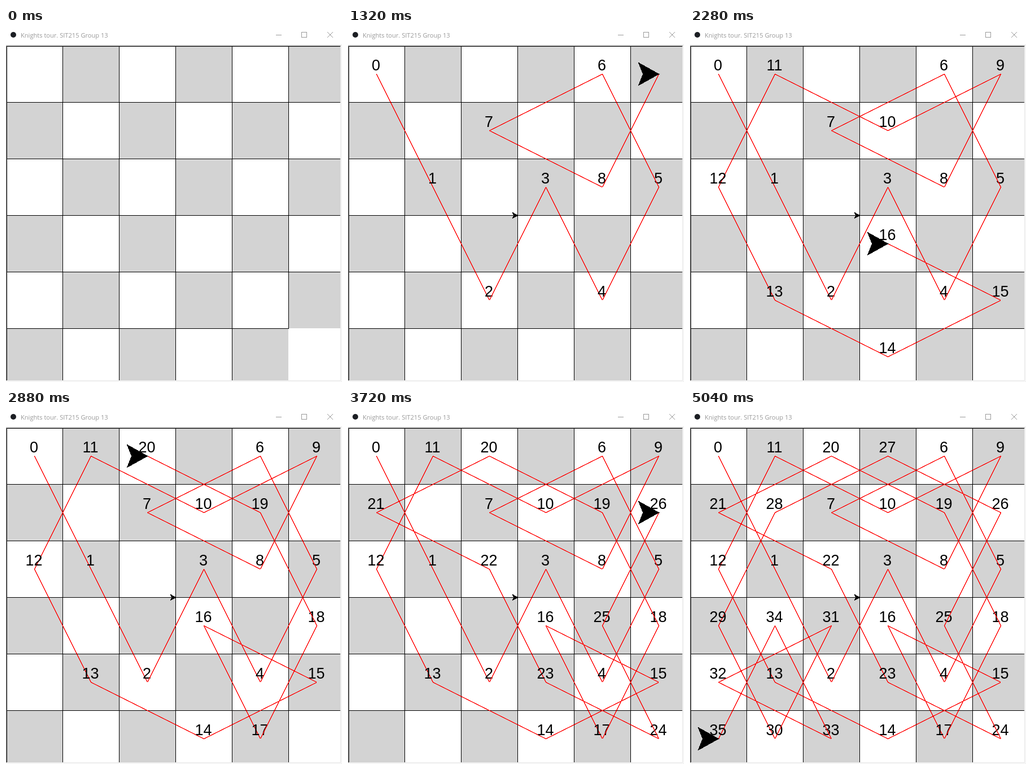
An HTML page for the animation above (5.16 s loop, 595 by 626 pixels).

```html
<!DOCTYPE html>
<html lang="en">
<head>
<meta charset="utf-8">
<title>Knights tour</title>
<style>
  html, body { margin: 0; width: 100%; height: 100%; overflow: hidden; background: #fff; }
  svg { display: block; }
  .crisp { shape-rendering: crispEdges; }
  .num { font: 27px "Liberation Sans", Arial, sans-serif; text-anchor: middle; }
  .title { font: 11.1px "Open Sans", "Noto Sans", sans-serif; fill: #999; }
</style>
</head>
<body>
<svg id="stage" width="595" height="626" viewBox="0 0 595 626" xmlns="http://www.w3.org/2000/svg"></svg>
<script>
const NS = 'http://www.w3.org/2000/svg';
const STEP = 120, TICKS = 43, CELL = 100;
const stage = document.getElementById('stage');

// Column and row of each square visited, in order.
const tour = ('00 12 24 32 44 52 40 21 42 50 31 10 02 14 35 54 33 45 ' +
  '53 41 20 01 22 34 55 43 51 30 11 03 15 23 04 25 13 05').split(' ')
  .map(s => ({ x: s[0] * CELL + 50, y: s[1] * CELL + 81 }));

// Ticks at which the knight has moved but not yet written its number.
const pauses = [11, 20, 28, 33, 36];

function add(parent, tag, attrs, text) {
  const el = document.createElementNS(NS, tag);
  for (const k in attrs) el.setAttribute(k, attrs[k]);
  if (text !== undefined) el.textContent = text;
  parent.appendChild(el);
  return el;
}

const rect = (parent, x, y, width, height, fill) =>
  add(parent, 'rect', { x, y, width, height, fill });

const show = (el, on) => el.setAttribute('visibility', on ? 'visible' : 'hidden');

function arrow(scale) {
  const pts = [[0, 0], [-9, -5], [-7, 0], [-9, 5]]
    .map(([x, y]) => x * scale + ',' + y * scale).join(' ');
  return add(stage, 'polygon', {
    points: pts, fill: '#000', stroke: '#000', class: 'crisp'
  });
}

const place = (el, x, y) =>
  el.setAttribute('transform', `translate(${x + 0.5} ${y + 0.5})`);

function drawWindow() {
  const g = add(stage, 'g', { class: 'crisp' });
  rect(g, 0, 0, 595, 626, '#f0f0f0');
  rect(g, 0, 0, 595, 29, '#fff');
  rect(g, 0, 31, 594, 594, '#fff');
  rect(g, 0, 31, 593, 593, '#a0a0a0');
  rect(g, 1, 32, 592, 592, '#e3e3e3');
  rect(g, 1, 32, 591, 591, '#000');
  rect(g, 2, 33, 590, 590, '#fff');
  add(stage, 'circle', { cx: 13, cy: 12, r: 5, fill: '#1c1f24' });
  add(stage, 'text', { x: 26, y: 17, class: 'title' }, 'Knights tour. SIT215 Group 13');
  const line = { fill: 'none', stroke: '#999' };
  add(stage, 'path', { d: 'M478 12.5H488M523.5 7.5H532.5V16.5H523.5Z', class: 'crisp', ...line });
  add(stage, 'path', { d: 'M569 7L579 17M579 7L569 17', ...line });
}

function drawBoard() {
  add(add(stage, 'clipPath', { id: 'board' }), 'rect', { x: 2, y: 33, width: 590, height: 590 });
  const g = add(stage, 'g', { class: 'crisp', 'clip-path': 'url(#board)' });
  for (let r = 0; r < 6; r++)
    for (let c = 0; c < 6; c++)
      if ((r + c) % 2) rect(g, c * CELL, r * CELL + 31, CELL, CELL, '#d3d3d3');
  for (let i = 1; i < 6; i++) {
    const end = i === 5 ? 501 : 600;
    rect(g, i * CELL, 31, 1, end, '#000');
    rect(g, 0, i * CELL + 31, end, 1, '#000');
  }
  const corner = add(g, 'g', {});
  rect(corner, 500, 531, 1, 100, '#000');
  rect(corner, 500, 531, 100, 1, '#000');
  return corner;
}

drawWindow();
const corner = drawBoard();

const moves = tour.map((p, i) => {
  const q = tour[Math.max(i - 1, 0)];
  const line = add(stage, 'line', {
    x1: q.x + 0.5, y1: q.y + 0.5, x2: p.x + 0.5, y2: p.y + 0.5,
    stroke: '#f00', class: 'crisp'
  });
  const label = add(stage, 'text', { x: p.x - 0.5, y: p.y - 6, class: 'num' }, i);
  return { line, label };
});

const home = arrow(1);
place(home, 300, 331);
const knight = arrow(4);

function render(ms) {
  const tick = Math.floor(ms / STEP) % TICKS;
  const at = tick - 2 - pauses.filter(p => p < tick).length;
  const written = pauses.includes(tick) ? at - 1 : at;
  show(corner, tick > 0);
  show(home, tick > 0);
  moves.forEach((m, i) => {
    show(m.line, i > 0 && i <= at);
    show(m.label, i <= written);
  });
  show(knight, at > 0);
  if (at > 0) place(knight, tour[at].x, tour[at].y);
}

let start;
function loop(now) {
  if (start === undefined) start = now;
  render(now - start);
  requestAnimationFrame(loop);
}
render(0);
requestAnimationFrame(loop);
</script>
</body>
</html>
```
